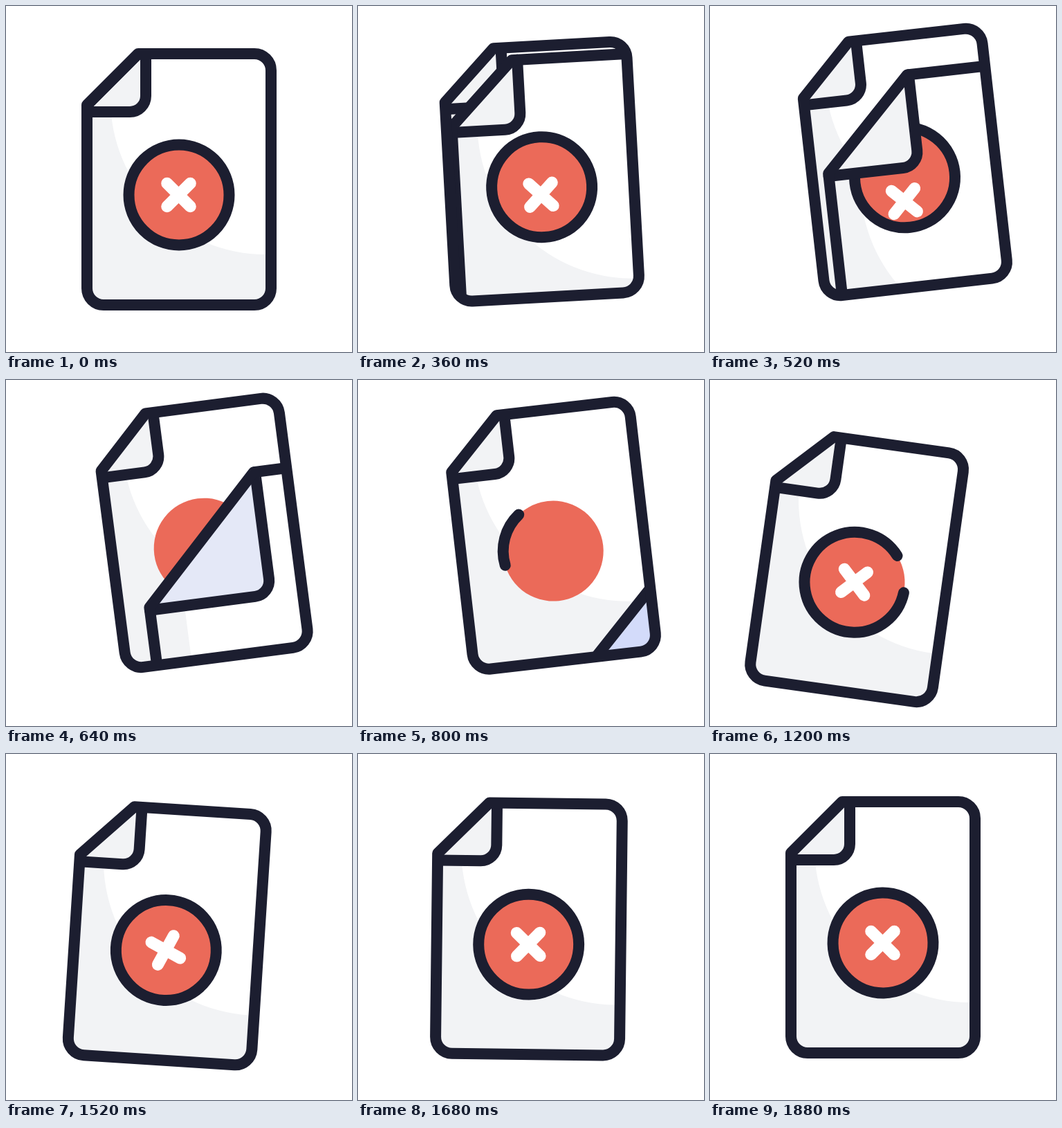
These frames come from a looping animation (500x500 px, 2000 ms). An HTML page:

```html
<!DOCTYPE html>
<html lang="en">
<head>
<meta charset="utf-8">
<title>Rejected document</title>
<style>
  html, body { margin: 0; width: 100%; height: 100%; overflow: hidden; background: #fff; }
  svg { display: block; width: 100vw; height: 100vh; }
  .line { fill: none; stroke: #1c1e30; stroke-width: 16; stroke-linecap: round; stroke-linejoin: round; }
  .disc { fill: #eb6a59; }
  .shade { fill: #f2f3f5; }
  .cross { fill: none; stroke: #fff; stroke-width: 17; stroke-linecap: round; }
</style>
</head>
<body>
<svg viewBox="0 0 500 500">
  <defs>
    <path id="body" d="M117 143L191 69H359a24 24 0 0 1 24 24V408a24 24 0 0 1-24 24H141a24 24 0 0 1-24-24Z"/>
    <path id="cross" d="M-16.8-16.8L16.8 16.8M16.8-16.8L-16.8 16.8"/>
    <path id="shade" d="M-100-900H151V135A224 224 0 0 0 375 359H700V640H-100Z"/>
    <clipPath id="inBody"><use href="#body"/></clipPath>
    <clipPath id="inSheet"><path id="sheetClip"/></clipPath>
  </defs>
  <g id="doc">
    <use href="#body" fill="#fff"/>
    <g clip-path="url(#inBody)">
      <use href="#shade" class="shade"/>
      <circle class="disc" cx="250" cy="273" r="72.5"/>
      <path id="ring" class="line"/>
      <use id="newCross" href="#cross" class="cross"/>
      <path class="shade" d="M117 143L191 69H202V130a23 23 0 0 1-23 23H117Z"/>
      <path class="line" d="M202 69V130a23 23 0 0 1-23 23H117"/>
      <g id="sheet">
        <g clip-path="url(#inSheet)">
          <rect width="500" height="500" fill="#fff"/>
          <use id="oldShade" href="#shade" class="shade"/>
          <circle class="disc" cx="250" cy="273" r="72.5"/>
          <circle class="line" cx="250" cy="273" r="72.5"/>
          <use id="oldCross" href="#cross" class="cross"/>
        </g>
        <path id="flap"/>
        <path id="flapEdge" class="line"/>
        <path id="sheetEdge" class="line"/>
      </g>
    </g>
    <use href="#body" class="line"/>
  </g>
</svg>
<script>
const LOOP = 2000;
const el = id => document.getElementById(id);
const set = (id, name, value) => el(id).setAttribute(name, value);
const clamp = (v, lo = 0, hi = 1) => Math.min(hi, Math.max(lo, v));
const mix = (a, b, p) => a + (b - a) * p;

// Cubic bezier easing with handles (x1, 0) and (x2, 1)
function ease(t, start, end, x1 = 0.5, x2 = 0.3) {
  const x = clamp((t - start) / (end - start));
  let lo = 0, hi = 1;
  for (let i = 0; i < 24; i++) {
    const s = (lo + hi) / 2, r = 1 - s;
    if (3 * r * r * s * x1 + 3 * r * s * s * x2 + s * s * s < x) lo = s; else hi = s;
  }
  return lo * lo * (3 - 2 * lo);
}

// Smooth curve through [time, value] keys
function track(t, keys) {
  const last = keys.length - 1;
  if (t <= keys[0][0]) return keys[0][1];
  if (t >= keys[last][0]) return keys[last][1];
  const i = keys.findIndex(key => key[0] > t) - 1;
  const slope = n => {
    const a = keys[Math.max(0, n - 1)], b = keys[Math.min(last, n + 1)];
    return (b[1] - a[1]) / (b[0] - a[0]);
  };
  const [t0, a] = keys[i], [t1, b] = keys[i + 1];
  const d = t1 - t0, u = (t - t0) / d, v = 1 - u;
  return a * v * v * (1 + 2 * u) + b * u * u * (3 - 2 * u)
    + d * u * v * (slope(i) * v - slope(i + 1) * u);
}

function tilt(t) {
  if (t < 700) return -7.5 * ease(t, 70, 700, 0.5, 0.5);
  if (t < 1250) return mix(-7.5, 8.1, ease(t, 700, 1250));
  return 8.1 * (1 - ease(t, 1250, 1860));
}

function drawSheet(t) {
  const k = (Math.max(0, t - 80) / 440) ** 2.5;
  const fold = 260 + 136 * k, top = 69 + 57 * k, left = 117 + 24 * k;
  const foldX = fold - top, foldY = fold - left;
  const grown = Math.min(1, k);
  const flapX = foldX + mix(11, 2, grown), flapY = foldY + mix(10, 4, grown);
  const edge = `M${left} 460V${foldY}L${foldX} ${top}H${Math.max(420, foldX)}`;
  const flapEdge = `M${flapX} ${top}V${flapY - 23}a23 23 0 0 1-23 23H${left}`;
  const tint = clamp((t - 530) / 240);
  const color = [[242, 211], [243, 219], [245, 250]].map(([a, b]) => Math.round(mix(a, b, tint)));

  el('sheet').style.display = fold > 840 ? 'none' : '';
  set('sheetClip', 'd', `${edge}V460Z`);
  set('sheetEdge', 'd', edge);
  set('flapEdge', 'd', flapEdge);
  set('flap', 'd', `${flapEdge}V${foldY}L${foldX} ${top}Z`);
  set('flap', 'fill', `rgb(${color})`);
  set('oldShade', 'transform', `translate(${33 * k} ${165 * k})`);
  set('oldCross', 'transform', `translate(${249.5 - 4 * k} ${273 + 34 * k})`);
}

function drawRing(t) {
  const tail = track(t, [[680, 115], [800, 170], [960, 243], [1200, 364], [1300, 404]]);
  const sweep = track(t, [[680, 0], [800, 63], [960, 148], [1200, 316], [1300, 360]]);
  const at = deg => {
    const a = deg * Math.PI / 180;
    return `${250 + 72.5 * Math.cos(a)} ${273 + 72.5 * Math.sin(a)}`;
  };
  const arcTo = deg => `A72.5 72.5 0 0 1 ${at(deg)}`;
  const path = `M${at(tail)}${arcTo(tail + sweep / 2)}${arcTo(tail + sweep)}`;
  set('ring', 'd', sweep > 0 ? path : '');
}

function drawCross(t) {
  const x = track(t, [[780, 14], [960, 8], [1180, 0]]);
  const y = track(t, [[780, -150], [960, -55], [1180, 0]]);
  const spin = 90 * ease(t, 1220, 1750);
  el('newCross').style.display = t > 780 ? '' : 'none';
  set('newCross', 'transform', `translate(${249.5 + x} ${273 + y}) rotate(${spin})`);
}

function draw(t) {
  const a = tilt(t);
  const x = -5 * a - 0.015 * a * a, y = 3.25 * a - 0.105 * a * a;
  set('doc', 'transform', `translate(${x} ${y}) rotate(${a} 250 273)`);
  drawRing(t);
  drawCross(t);
  drawSheet(t);
}

let begin;
function tick(now) {
  begin ??= now;
  draw((now - begin) % LOOP);
  requestAnimationFrame(tick);
}
draw(0);
requestAnimationFrame(tick);
</script>
</body>
</html>
```
